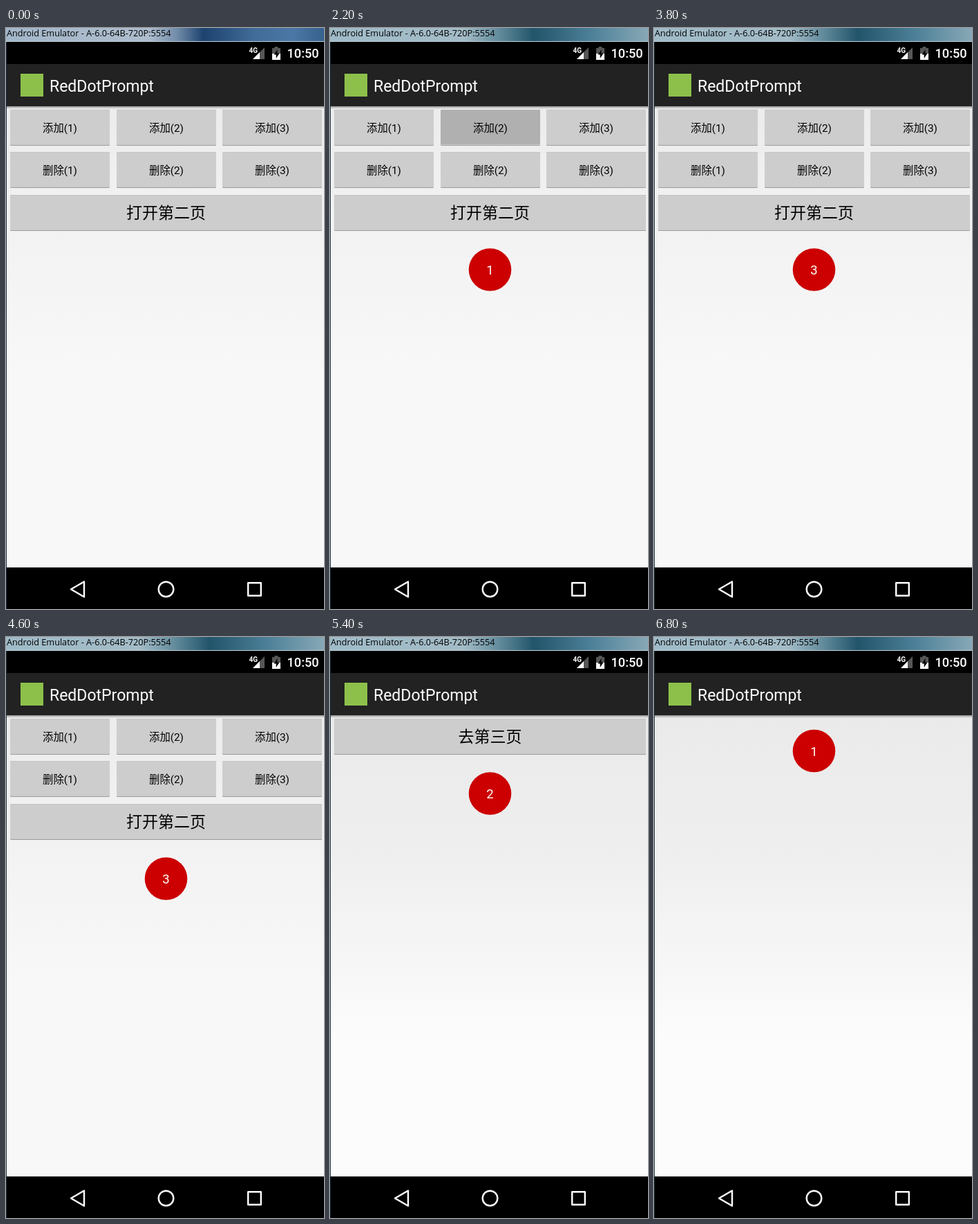
Animation of 460 by 839 pixels, one loop 8 s. Source, as an HTML page:

```html
<!DOCTYPE html>
<html lang="zh-CN">
<head>
<meta charset="utf-8">
<title>RedDotPrompt</title>
<style>
html, body { margin: 0; width: 100%; height: 100%; overflow: hidden; background: #000; }
svg { display: block; width: 460px; height: 839px; }
text { font-family: Roboto, "Noto Sans CJK SC", "Noto Sans CJK", sans-serif; }
.mid { text-anchor: middle; }
.label { font-size: 15.35px; }
.wide { font-size: 23px; }
.num { font-size: 18.5px; fill: #fff; text-anchor: middle; }

.timed { animation: 8s step-end infinite; opacity: 0; }
#focus { animation-name: focus; }
#dot1 { animation-name: dot; }
#n1 { animation-name: one; }
#n2 { animation-name: two; }
#n3 { animation-name: three; }
#add1 .press { animation-name: add1; }
#add2 .press { animation-name: add2; }
#add3 .press { animation-name: add3; }
#open .press { animation-name: open; }
#next .press { animation-name: next; }
#page2 { animation-name: page2; }
#page3 { animation-name: page3; }

@keyframes focus { 0% { opacity: 0 } 6.25% { opacity: 1 } to { opacity: 1 } }
@keyframes dot { 0% { opacity: 0 } 12.5% { opacity: 1 } to { opacity: 1 } }
@keyframes one { 0%, 32.5% { opacity: 0 } 12.5% { opacity: 1 } }
@keyframes two { 0%, 47.5% { opacity: 0 } 32.5% { opacity: 1 } }
@keyframes three { 0% { opacity: 0 } 47.5% { opacity: 1 } to { opacity: 1 } }
@keyframes add3 { 0%, 12.5% { opacity: 0 } 6.25% { opacity: 1 } }
@keyframes add2 { 0%, 32.5% { opacity: 0 } 27.5% { opacity: 1 } }
@keyframes add1 { 0%, 47.5% { opacity: 0 } 43.75% { opacity: 1 } }
@keyframes open { 0%, 57.5% { opacity: 0 } 56.25% { opacity: 1 } }
@keyframes next { 0%, 83.75% { opacity: 0 } 82.5% { opacity: 1 } }
/* a new page fades in while it settles upwards */
@keyframes page2 {
  0% { opacity: 0; transform: none }
  65% { opacity: .5; transform: translateY(22px) }
  66.25% { opacity: .92; transform: translateY(4px) }
  67.5%, to { opacity: 1; transform: none }
}
@keyframes page3 {
  0% { opacity: 0; transform: none }
  83.75% { opacity: .75; transform: translateY(10px) }
  85%, to { opacity: 1; transform: none }
}
</style>
</head>
<body>
<svg viewBox="0 0 460 839">
  <defs>
    <linearGradient id="glassIdle">
      <stop offset="0" stop-color="#a3b7ca"/>
      <stop offset=".45" stop-color="#aebdcd"/>
      <stop offset=".54" stop-color="#6f8aa8"/>
      <stop offset=".62" stop-color="#1d436f"/>
      <stop offset=".78" stop-color="#416b98"/>
      <stop offset=".9" stop-color="#4b78a6"/>
      <stop offset="1" stop-color="#37618f"/>
    </linearGradient>
    <linearGradient id="glassFocus">
      <stop offset="0" stop-color="#a0bbc8"/>
      <stop offset=".42" stop-color="#a3bcc7"/>
      <stop offset=".54" stop-color="#5d8798"/>
      <stop offset=".64" stop-color="#22546a"/>
      <stop offset=".82" stop-color="#4c8098"/>
      <stop offset="1" stop-color="#88a8b6"/>
    </linearGradient>
    <linearGradient id="paper1" x2="0" y2="1">
      <stop offset="0" stop-color="#ececec"/>
      <stop offset=".27" stop-color="#f2f2f2"/>
      <stop offset=".57" stop-color="#f8f8f8"/>
    </linearGradient>
    <linearGradient id="paper2" x2="0" y2="1">
      <stop offset="0" stop-color="#eaeaea"/>
      <stop offset=".31" stop-color="#efefef"/>
      <stop offset=".71" stop-color="#fcfcfc"/>
    </linearGradient>
    <linearGradient id="shade" x2="0" y2="1">
      <stop offset="0" stop-color="#000" stop-opacity=".35"/>
      <stop offset="1" stop-color="#000" stop-opacity="0"/>
    </linearGradient>
    <clipPath id="screen"><rect x="1" y="52" width="459" height="727"/></clipPath>
    <g id="header">
      <rect x="1" y="52" width="459" height="61" fill="#222"/>
      <rect x="1" y="113" width="459" height="4" fill="url(#shade)"/>
      <rect x="21" y="66" width="33" height="33" fill="#8dc04b"/>
      <text x="63" y="91.5" font-size="23" fill="#fff">RedDotPrompt</text>
    </g>
    <circle id="dot" cx="231.5" r="30.8" fill="#c00"/>
  </defs>

  <rect width="460" height="839" fill="#1b2b45"/>
  <rect width="460" height="20" fill="url(#glassIdle)"/>
  <g id="focus" class="timed">
    <rect width="460" height="839" fill="#1a323d"/>
    <rect width="460" height="20" fill="url(#glassFocus)"/>
  </g>
  <text x="1" y="12" style="font:12.67px 'Open Sans','Noto Sans',sans-serif">Android Emulator - A-6.0-64B-720P:5554</text>
  <rect y="19" width="460" height="1" fill="#c3d3dc"/>
  <rect x="1" y="20" width="459" height="819" fill="#000"/>

  <g id="status">
    <text x="351.5" y="36" font-size="10" font-weight="700" fill="#fff">4G</text>
    <path d="M374 28V45H357Z" fill="#565656"/>
    <path d="M367 35V45H357Z" fill="#fff"/>
    <path d="M385 29h3.5v-2h5v2h3.5v8h-12z" fill="#565656"/>
    <path d="M385 37h12v9h-12z" fill="#fff"/>
    <path d="M392.5 31l-5 7.5h3.2V44l4.8-7.5h-3z" fill="#000"/>
    <text x="406.5" y="43" font-size="18.2" font-weight="500" fill="#fff">10:50</text>
  </g>

  <g clip-path="url(#screen)">
    <g id="page1">
      <rect x="1" y="113" width="459" height="667" fill="url(#paper1)"/>
      <use href="#header"/>
      <g id="buttons1"></g>
      <g id="dot1" class="timed"><use href="#dot" y="349"/></g>
      <text id="n1" class="num timed" x="231.5" y="356">1</text>
      <text id="n2" class="num timed" x="231.5" y="356">2</text>
      <text id="n3" class="num timed" x="231.5" y="356">3</text>
    </g>
    <g id="page2" class="timed">
      <rect x="1" y="113" width="459" height="667" fill="url(#paper2)"/>
      <use href="#header"/>
      <g id="buttons2"></g>
      <use href="#dot" y="226"/>
      <text class="num" x="231.5" y="233">2</text>
    </g>
    <g id="page3" class="timed">
      <rect x="1" y="113" width="459" height="667" fill="url(#paper2)"/>
      <use href="#header"/>
      <use href="#dot" y="164.5"/>
      <text class="num" x="231.5" y="171.5">1</text>
    </g>
  </g>

  <g fill="none" stroke="#fff" stroke-width="2.4" stroke-linejoin="round">
    <path d="M94 810.5L113 799.5V821.5Z"/>
    <circle cx="231.5" cy="810.5" r="10.8"/>
    <rect x="350.2" y="801.2" width="18.6" height="18.6"/>
  </g>
</svg>
<script>
const button = (id, x, y, w, label, size = 'label') => `
  <g id="${id}">
    <rect x="${x}" y="${y}" width="${w}" height="52" rx="1.5" fill="#9c9c9c"/>
    <rect x="${x}" y="${y}" width="${w}" height="51" rx="1.5" fill="#cdcdcd"/>
    <rect x="${x + 1}" y="${y}" width="${w - 2}" height="1" fill="#c4c4c4"/>
    <rect class="press timed" x="${x}" y="${y}" width="${w}" height="50" rx="1.5" fill="#b0b0b0"/>
    <text class="mid ${size}" x="${x + w / 2}" y="${y + (size === 'wide' ? 34 : 32)}">${label}</text>
  </g>`;

const row = (name, y, label) => [1, 2, 3].map(n =>
  button(name + n, Math.round(6 + (n - 1) * 153.5), y, 144, `${label}(${n})`)).join('');

buttons1.innerHTML = row('add', 118, '添加') + row('del', 179, '删除') +
  button('open', 6, 241, 451, '打开第二页', 'wide');
buttons2.innerHTML = button('next', 6, 118, 451, '去第三页', 'wide');
</script>
</body>
</html>
```
